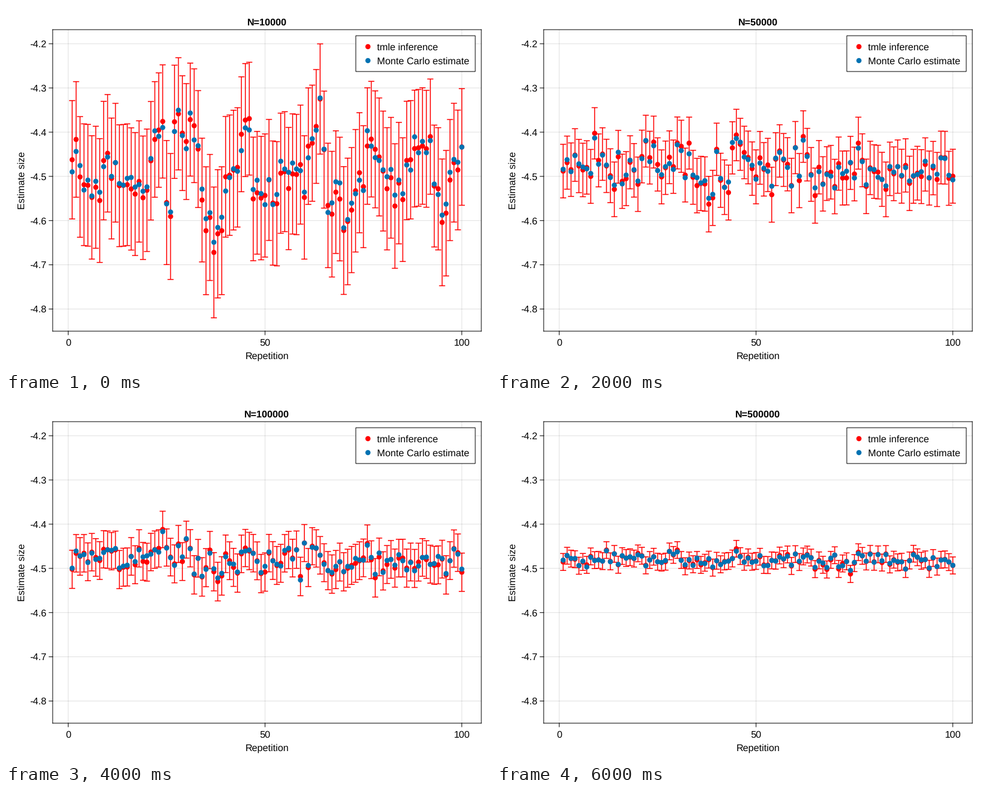
Animation, 800 px wide and 600 px high, one loop 7 s. Source, as a matplotlib script:

```python
import matplotlib.pyplot as plt
import numpy as np
from matplotlib.animation import FuncAnimation
from matplotlib.collections import EllipseCollection, LineCollection
from matplotlib.lines import Line2D
from matplotlib.patches import Circle, Rectangle
from matplotlib.transforms import Affine2D

W, H, DPI = 800, 600, 100
PX = 72 / DPI  # points per pixel
PIXELS = Affine2D().scale(1, -1).translate(0, H)  # origin at the top left
RED, BLUE = "#ff0000", "#0072b2"
DOT = 8.5  # diameter in pixels
MEAN = -4.48
SIZES = [10000, 25000, 50000, 75000, 100000, 250000, 500000]

# Main swings of the smallest sample, in hundredths below -4
SWING_X = [1, 7, 11, 18, 24, 26, 27, 32, 35, 38, 40, 46, 47, 60, 64, 66, 72,
           78, 83, 91, 95, 100]
SWING_Y = [44, 54, 46, 55, 41, 63, 39, 40, 59, 67, 51, 39, 56, 51, 34, 56, 60,
           40, 55, 41, 57, 46]

plt.rcParams.update({
    "font.family": "Liberation Sans",
    "font.size": 16 * PX,
    "text.hinting": "none",
    "path.snap": False,
})

reps = np.arange(1, 101)


def simulate():
    """Estimates from growing samples: each size extends the previous one."""
    rng = np.random.default_rng(12)
    swing = -4 - np.interp(reps, SWING_X, SWING_Y) / 100
    first = np.clip(swing + rng.uniform(-0.045, 0.045, reps.size),
                    -4.672, -4.325)
    total, last, runs = (first - MEAN) * SIZES[0], SIZES[0], []
    for n in SIZES:
        total = total + 6.8 * np.sqrt(n - last) * rng.normal(size=reps.size)
        last = n
        red = MEAN + total / n
        noise = rng.normal(0, 1.5 / np.sqrt(n), reps.size)
        blue = MEAN + 0.87 * (red - MEAN) + noise
        half = (13.3 - 6.7 * (red + 4.45)) / np.sqrt(n)
        runs.append((red, blue, half))
    return runs


RUNS = simulate()

fig = plt.figure(figsize=(W / DPI, H / DPI), dpi=DPI, facecolor="white")
ax = fig.add_axes([77 / W, 1 - 536 / H, 707 / W, 497 / H])
ax.set_xlim(-3.95, 104.95)
ax.set_ylim(-4.8501, -4.1682)
ax.set_axisbelow(True)
ax.grid(color="black", alpha=0.12, lw=PX)
ax.tick_params(length=0, labelbottom=False, labelleft=False)
for spine in ax.spines.values():
    spine.set_linewidth(PX)

x_ticks = [0, 50, 100]
y_ticks = np.arange(-4.8, -4.15, 0.1)
ax.set_xticks(x_ticks)
ax.set_yticks(y_ticks)


def label(x, y, text, ha="center", **style):
    """Text with its baseline at pixel (x, y)."""
    return fig.text(x, y, text, ha=ha, va="baseline", transform=PIXELS,
                    zorder=6, **style)


def tick(xs, ys):
    fig.add_artist(Line2D(xs, ys, color="black", lw=PX, transform=PIXELS))


for t in x_ticks:
    x = 102.64 + 6.492 * t
    tick([x, x], [536, 542])
    label(x, 560, str(t))
for t in y_ticks:
    y = 62.2 - 728.8 * (t + 4.2)
    tick([71, 77], [y, y])
    label(66.5, y + 5.7, f"{t:.1f}", ha="right")
label(430.5, 582, "Repetition")
label(30.5, 287.5, "Estimate size", rotation=90, rotation_mode="anchor")
title = label(430.5, 32, "", weight="bold")

fig.add_artist(Rectangle((577, 49), 197, 59, transform=PIXELS, fc="white",
                         ec="black", lw=PX, zorder=5))
for y, color, name in [(67, RED, "tmle inference"),
                       (90, BLUE, "Monte Carlo estimate")]:
    fig.add_artist(Circle((597, y), DOT / 2, transform=PIXELS, fc=color, lw=0,
                          zorder=6))
    label(612, y + 6, name, ha="left")


def dots(color, zorder):
    size = np.full(reps.size, DOT)
    return ax.add_collection(
        EllipseCollection(size, size, np.zeros(reps.size), units="dots",
                          offsets=np.zeros((reps.size, 2)),
                          offset_transform=ax.transData,
                          facecolors=color, linewidths=0, zorder=zorder),
        autolim=False)


bars = ax.add_collection(
    LineCollection([], colors=RED, linewidths=1.5 * PX, zorder=3),
    autolim=False)
red_dots = dots(RED, 4)
blue_dots = dots(BLUE, 5)
CAP = 5 / 6.492  # half a whisker, in repetitions


def error_bar(x, low, high):
    return [[(x, low), (x, high)],
            [(x - CAP, low), (x + CAP, low)],
            [(x - CAP, high), (x + CAP, high)]]


def draw(i):
    red, blue, half = RUNS[i]
    title.set_text(f"N={SIZES[i]}")
    bars.set_segments([line for x, y, h in zip(reps, red, half)
                       for line in error_bar(x, y - h, y + h)])
    red_dots.set_offsets(np.column_stack([reps, red]))
    blue_dots.set_offsets(np.column_stack([reps, blue]))
    return title, bars, red_dots, blue_dots


anim = FuncAnimation(fig, draw, frames=len(SIZES), interval=1000, repeat=True,
                     repeat_delay=0)
plt.show()
```
